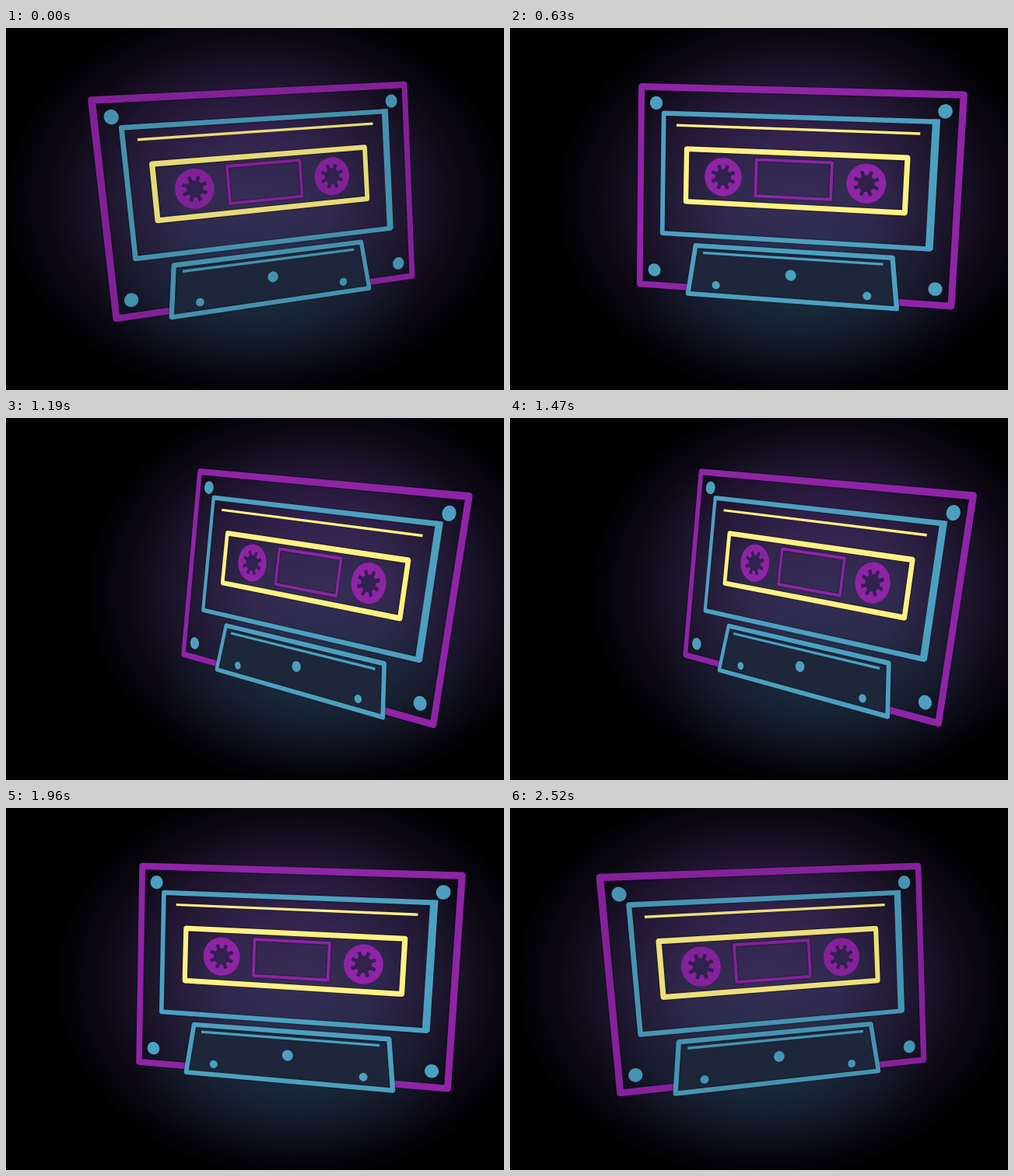
Write an HTML page with a canvas that moves like this. It is 640 by 466 pixels and loops after 2590 ms.

```html
<!DOCTYPE html>
<html lang="en">
<head>
<meta charset="utf-8">
<title>Neon cassette</title>
<style>
  html, body { margin: 0; width: 100%; height: 100%; overflow: hidden; background: #000; }
  canvas { display: block; width: 640px; height: 466px; }
</style>
</head>
<body>
<canvas id="stage" width="640" height="466"></canvas>
<script>
const ctx = document.getElementById('stage').getContext('2d');

const LOOP = 2590, STEP = 70, TURN = 24;
const W = 414, H = 263; // size of the cassette's own plane

// Corner positions along the swing: x, y for TL, TR, BR, BL.
const SWING = [24, 326, 816, 1166];
const CORNERS = [
  [110, 93, 512, 73, 522, 319, 142, 374],
  [137, 81, 558, 80, 555, 340, 148, 347],
  [197, 73, 593, 91, 566, 371.5, 187, 319],
  [249, 69, 595, 101, 549, 394.5, 228, 304]
];

const PURPLE = [143, 36, 166], CYAN = [76, 160, 191], YELLOW = [255, 242, 130];
const HUB = 'rgb(48,33,78)', SHADE = 'rgba(6,4,16,.2)';

let project, light;

// Smooth curve through the four poses.
function cornersAt(d) {
  const weights = SWING.map((a, i) =>
    SWING.reduce((p, b, j) => i === j ? p : p * (d - b) / (a - b), 1));
  return CORNERS[0].map((_, k) =>
    weights.reduce((sum, w, i) => sum + w * CORNERS[i][k], 0));
}

// Perspective map from the plane to the given quad.
function makeProjection([x0, y0, x1, y1, x2, y2, x3, y3]) {
  const dx1 = x1 - x2, dx2 = x3 - x2, sx = x0 - x1 + x2 - x3;
  const dy1 = y1 - y2, dy2 = y3 - y2, sy = y0 - y1 + y2 - y3;
  const den = dx1 * dy2 - dx2 * dy1;
  const g = (sx * dy2 - dx2 * sy) / den, h = (dx1 * sy - sx * dy1) / den;
  const a = x1 - x0 + g * x1, b = x3 - x0 + h * x3;
  const c = y1 - y0 + g * y1, e = y3 - y0 + h * y3;
  return ([x, y]) => {
    const u = x / W, v = y / H, w = 1 + g * u + h * v;
    return [(a * u + b * v + x0) / w, (c * u + e * v + y0) / w];
  };
}

const tone = rgb => `rgb(${rgb.map(c => Math.round(c * light))})`;

const box = (l, t, r, b) => [[l, t], [r, t], [r, b], [l, b]];

function ring(x, y, radius, n = 32) {
  return Array.from({ length: n }, (_, i) => {
    const a = -2 * Math.PI * i / n;
    return [x + radius * Math.cos(a), y + radius * Math.sin(a)];
  });
}

function fill(shapes, color) {
  ctx.beginPath();
  for (const shape of shapes) {
    shape.forEach((p, i) => ctx[i ? 'lineTo' : 'moveTo'](...project(p)));
    ctx.closePath();
  }
  ctx.fillStyle = color;
  ctx.fill();
}

function bar([ax, ay], [bx, by], width) {
  const k = width / 2 / Math.hypot(bx - ax, by - ay);
  const nx = -(by - ay) * k, ny = (bx - ax) * k;
  return [[ax + nx, ay + ny], [bx + nx, by + ny], [bx - nx, by - ny], [ax - nx, ay - ny]];
}

function outline(points, width) {
  return points.flatMap((p, i) =>
    [bar(p, points[(i + 1) % points.length], width), ring(...p, width / 2, 16)]);
}

function tube(points, width, rgb) {
  fill(outline(points, width + 3), SHADE);
  fill(outline(points, width), tone(rgb));
}

const line = (a, b, width, rgb) => fill([bar(a, b, width)], tone(rgb));
const dot = (x, y, radius, rgb) => fill([ring(x, y, radius)], tone(rgb));

function reel(x, y) {
  dot(x, y, 25, PURPLE);
  const teeth = Array.from({ length: 8 }, (_, i) => {
    const a = (i + 0.5) * Math.PI / 4, c = Math.cos(a), s = Math.sin(a);
    return bar([x + 5 * c, y + 5 * s], [x + 16.5 * c, y + 16.5 * s], 4.6);
  });
  fill([ring(x, y, 10.5), ...teeth], HUB);
}

function glow(x, y, rx, ry, stops) {
  ctx.save();
  ctx.translate(x, y);
  ctx.scale(rx, ry);
  const g = ctx.createRadialGradient(0, 0, 0, 0, 0, 1);
  stops.forEach(([at, color]) => g.addColorStop(at, color));
  ctx.fillStyle = g;
  ctx.fillRect(-1, -1, 2, 2);
  ctx.restore();
}

function backdrop(cx, d) {
  ctx.fillStyle = '#000';
  ctx.fillRect(0, 0, 640, 466);
  glow(cx, 222, 326 - 0.02 * d, 258, [
    [0, 'rgb(54,46,86)'], [0.3, 'rgb(49,41,78)'], [0.5, 'rgb(36,28,56)'],
    [0.65, 'rgb(25,19,39)'], [0.8, 'rgb(13,9,21)'], [0.93, 'rgb(5,3,9)'], [1, 'rgb(0,0,0)']
  ]);
  glow(cx - 15, 125, 210, 95, [[0, 'rgba(62,18,82,.28)'], [1, 'rgba(62,18,82,0)']]);
  glow(cx, 345, 210, 110, [[0, 'rgba(12,58,66,.55)'], [1, 'rgba(12,58,66,0)']]);
}

function cassette() {
  const base = [[77.5, 206], [337.5, 206], [346, 271.5], [68, 271.5]];

  tube(box(0, 0, W, H), 8.6, PURPLE);
  for (const x of [20.5, 393]) for (const y of [20.5, 242.5]) dot(x, y, 8.7, CYAN);

  tube(box(31, 33.5, 383.5, 192), 6.3, CYAN);
  fill([box(378, 30.4, 387.5, 193)], tone(CYAN));
  line([48.5, 48.7], [364, 48.7], 3.2, YELLOW);

  tube(box(63, 79, 350, 148), 6.8, YELLOW);
  reel(113, 113.5);
  reel(300, 113.5);
  tube(box(157, 89, 255.5, 136), 3.8, PURPLE);

  fill([base], 'rgb(29,38,58)');
  tube(base, 6.3, CYAN);
  line([88, 215], [326, 215], 3.4, CYAN);
  dot(207, 237.5, 7.2, CYAN);
  dot(106.5, 257.5, 5.4, CYAN);
  dot(307.5, 257.5, 5.4, CYAN);
}

function draw(t) {
  // Steady swing to one side and back again.
  const away = Math.abs(t - TURN);
  const d = Math.min(away, LOOP - away);
  const quad = cornersAt(d);
  project = makeProjection(quad);
  light = 0.9 + 0.1 * Math.min(1, d / 350);
  backdrop((quad[0] + quad[2] + quad[4] + quad[6]) / 4, d);
  cassette();
}

const start = performance.now();
function tick() {
  const t = Math.max(0, performance.now() - start) % LOOP;
  draw(Math.floor(t / STEP) * STEP);
  requestAnimationFrame(tick);
}
tick();
</script>
</body>
</html>
```
